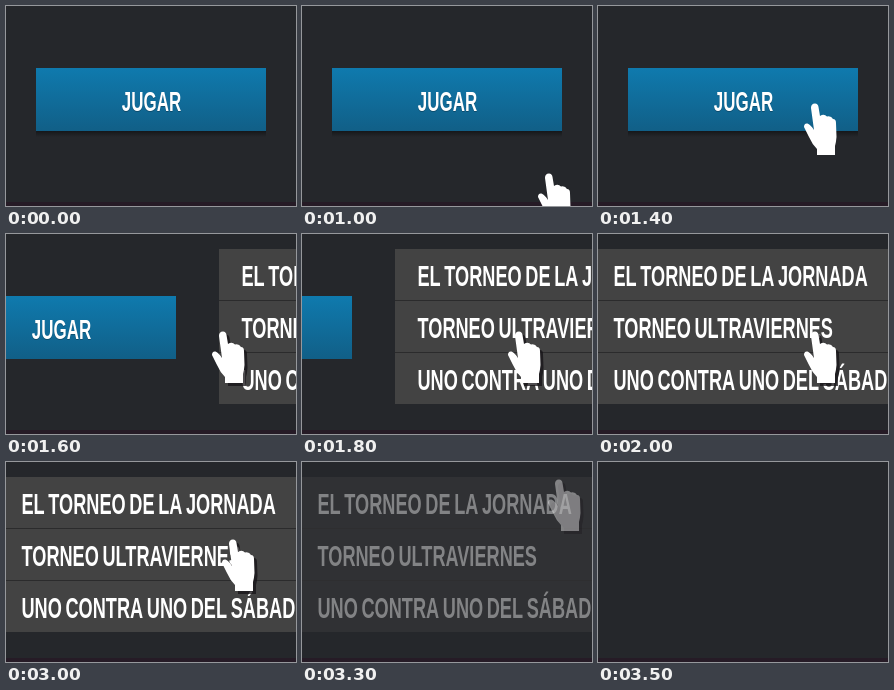
An HTML page with a canvas for the animation above (3600 ms loop, 290x200 px).

```html
<!DOCTYPE html>
<html lang="es">
<head>
<meta charset="utf-8">
<style>
  html, body { margin: 0; width: 100%; height: 100%; overflow: hidden; background: #25272b; }
  canvas { display: block; }
</style>
</head>
<body>
<canvas id="stage" width="290" height="200"></canvas>
<script>
const ctx = document.getElementById('stage').getContext('2d');
const LOOP = 3600, STEP = 100;
const CONDENSE = 0.605;
const ROWS = ['EL TORNEO DE LA JORNADA', 'TORNEO ULTRAVIERNES', 'UNO CONTRA UNO DEL SÁBADO'];

// Pointing hand, fingertip at the origin
const hand = new Path2D(`M-4 2 Q-4 -2.5 0 -2.5 Q3 -2.5 3.5 1 L5 10
  Q9 7.5 12 10.5 Q16 9.5 18 13 Q21 13 21 17 L21.5 31 Q21 37 20 40 V49 H2 V43
  Q-3 38 -6 31 L-11 21 Q-11 17 -7.5 17.5 Q-4 19 -1 24 Z`);

const clamp = (v, lo, hi) => Math.min(hi, Math.max(lo, v));
const progress = (t, from, to) => clamp((t - from) / (to - from), 0, 1);

function rect(color, x, y, w, h) {
  ctx.fillStyle = color;
  ctx.fillRect(x, y, w, h);
}

function gradient(y0, y1, from, to) {
  const g = ctx.createLinearGradient(0, y0, 0, y1);
  g.addColorStop(0, from);
  g.addColorStop(1, to);
  return g;
}

function label(text, x, y, size, align, color = '#fff') {
  ctx.save();
  ctx.translate(x, y);
  ctx.scale(CONDENSE, 1);
  ctx.font = `bold ${size}px "Liberation Sans", Arial, sans-serif`;
  ctx.wordSpacing = '-2.3px';
  ctx.textAlign = align;
  ctx.fillStyle = color;
  ctx.fillText(text, 0, 0);
  ctx.restore();
}

function drawButton(x, pressed, raised) {
  if (raised) rect(gradient(125, 131, '#15171a', '#25272b'), x, 125, 230, 6);
  rect(gradient(62, 125, '#0f7aae', '#115f87'), x, 62, 230, 63);
  if (pressed) rect('rgba(0,0,0,.1)', x, 62, 230, 63);
  label('JUGAR', x + 115.5, 106, 28, 'center', 'rgba(0,0,0,.25)');
  label('JUGAR', x + 115.5, 105, 28, 'center');
}

function drawMenu(x) {
  rect('#434343', x, 15, 330, 155);
  ROWS.forEach((text, i) => {
    const y = 15 + 52 * i;
    if (i) rect('#2b2b2c', x, y - 1, 330, 1);
    label(text, x + 22.5, y + 37, 30, 'left');
  });
}

function drawHand(x, y, shadow) {
  ctx.save();
  ctx.translate(x, y);
  if (shadow) {
    ctx.translate(3, 3);
    ctx.fillStyle = 'rgba(20,18,22,.75)';
    ctx.fill(hand);
    ctx.translate(-3, -3);
  }
  ctx.fillStyle = '#fff';
  ctx.fill(hand);
  ctx.restore();
}

function draw(time) {
  const t = Math.floor(time % LOOP / STEP) * STEP;
  rect('#25272b', 0, 0, 290, 200);
  rect('#261b26', 0, 196, 290, 4);

  if (t < 3500) {
    const slide = t < 1600 ? 0 : 90 + (t - 1600) * 0.6;
    const reach = progress(t, 1000, 1400);
    const leave = clamp((t - 2900) / STEP, 0, 4);

    ctx.globalAlpha = 1 - progress(t, 3000, 3500);
    if (slide < 260) drawButton(30 - slide, t === 1500, t < 1500);
    if (slide) drawMenu(Math.max(-7, 303 - slide));
    if (t >= 1000) {
      drawHand(247 - 30 * reach + 10 * leave, 170 - 70 * reach - 20 * leave, t >= 1500);
    }
    ctx.globalAlpha = 1;
  }
}

function frame() {
  draw(performance.now() - start);
  requestAnimationFrame(frame);
}

const start = performance.now();
frame();
</script>
</body>
</html>
```
